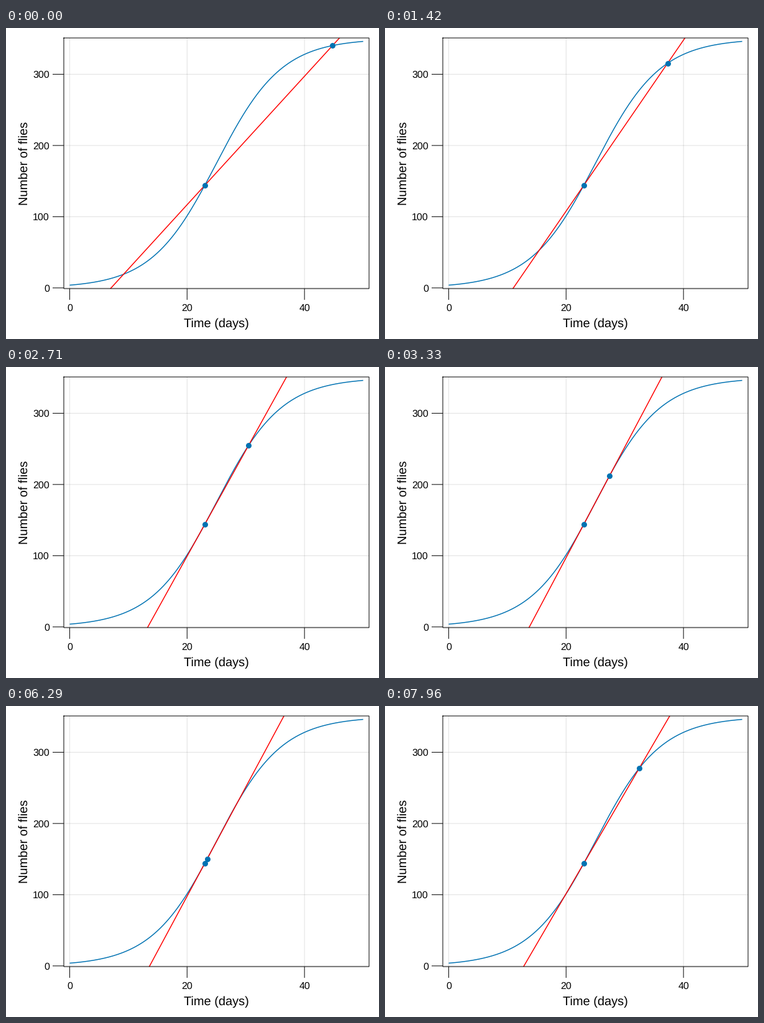
Write a matplotlib script that moves like this. It is 600 px wide and 500 px high and loops after 8000 ms.

```python
import numpy as np
import matplotlib.pyplot as plt
from matplotlib.animation import FuncAnimation
from matplotlib.patches import Rectangle

plt.rcParams["font.family"] = "Liberation Sans"
plt.rcParams["text.hinting"] = "none"

W, H, DPI = 600, 500, 100
PT = 72 / DPI                                  # points per pixel
LEFT, RIGHT, TOP, BOTTOM = 93, 584, 16, 419    # plot area in pixels
X_MIN, X_MAX, Y_MIN, Y_MAX = -1, 51, -1, 351
BLUE, RED = "#0072B2", "#FF0000"
FPS, FRAMES = 24, 192
BASE, NEAR, FAR = 23, 23.2, 45                 # days
STEP = (FAR - NEAR) / 99
RISE_START = 149


def px(x):
    return LEFT + (x - X_MIN) / (X_MAX - X_MIN) * (RIGHT - LEFT)


def py(y):
    return BOTTOM - (y - Y_MIN) / (Y_MAX - Y_MIN) * (BOTTOM - TOP)


def flies(t):
    return 350 / (1 + np.exp(-0.18 * (t - 25)))


def moving_day(n):
    """Slide towards the fixed point, wait there, then slide back."""
    falling = FAR - STEP * (n + 1)
    rising = NEAR + STEP * (n - RISE_START)
    return max(falling, rising, NEAR) if n < RISE_START else rising


fig = plt.figure(figsize=(W / DPI, H / DPI), dpi=DPI, facecolor="white")
ax = fig.add_axes([0, 0, 1, 1])
ax.set_xlim(0, W)
ax.set_ylim(H, 0)
ax.axis("off")


def line(xs, ys, color="black", width=1, **kw):
    kw.setdefault("solid_capstyle", "butt")
    return ax.plot(xs, ys, color=color, lw=width * PT, snap=False, **kw)[0]


def label(x, y, text, size, **kw):
    ax.text(x, y, text, fontsize=size * PT, color="black", **kw)


# Grid, ticks and tick labels
for v in (0, 20, 40):
    x = px(v)
    line([x, x], [TOP, BOTTOM], alpha=0.12)
    line([x, x], [BOTTOM, BOTTOM + 18])
    label(x, 455, str(v), 16, ha="center", va="baseline")
for v in (0, 100, 200, 300):
    y = py(v)
    line([LEFT, RIGHT], [y, y], alpha=0.12)
    line([LEFT - 18, LEFT], [y, y])
    label(70, y + 5.7, str(v), 16, ha="right", va="baseline")

label((LEFT + RIGHT) / 2, 481, "Time (days)", 20, ha="center", va="baseline")
label(34.5, (TOP + BOTTOM) / 2, "Number of flies", 20, rotation=90,
      rotation_mode="anchor", ha="center", va="baseline")

# Curve, secant and its two points
days = np.linspace(0, 50, 501)
line(px(days), py(flies(days)), BLUE, 1.5, zorder=3)
secant = line([], [], RED, 1.5, zorder=4)
secant.set_clip_path(Rectangle((LEFT, TOP), RIGHT - LEFT, BOTTOM - TOP,
                               transform=ax.transData))
dots = line([], [], BLUE, 0, ls="none", marker="o", ms=9 * PT, mew=0, zorder=5)

# Frame around the plot
line([LEFT, RIGHT, RIGHT, LEFT, LEFT], [TOP, TOP, BOTTOM, BOTTOM, TOP],
     zorder=6, solid_joinstyle="miter", solid_capstyle="projecting")


def update(n):
    t = np.array([BASE, moving_day(n)])
    y = flies(t)
    slope = (y[1] - y[0]) / (t[1] - t[0])
    ends = np.array([X_MIN, X_MAX])
    secant.set_data(px(ends), py(y[0] + slope * (ends - BASE)))
    dots.set_data(px(t), py(y))
    return secant, dots


anim = FuncAnimation(fig, update, frames=FRAMES, interval=1000 / FPS,
                     repeat=True, repeat_delay=0, blit=False)
plt.show()
```
